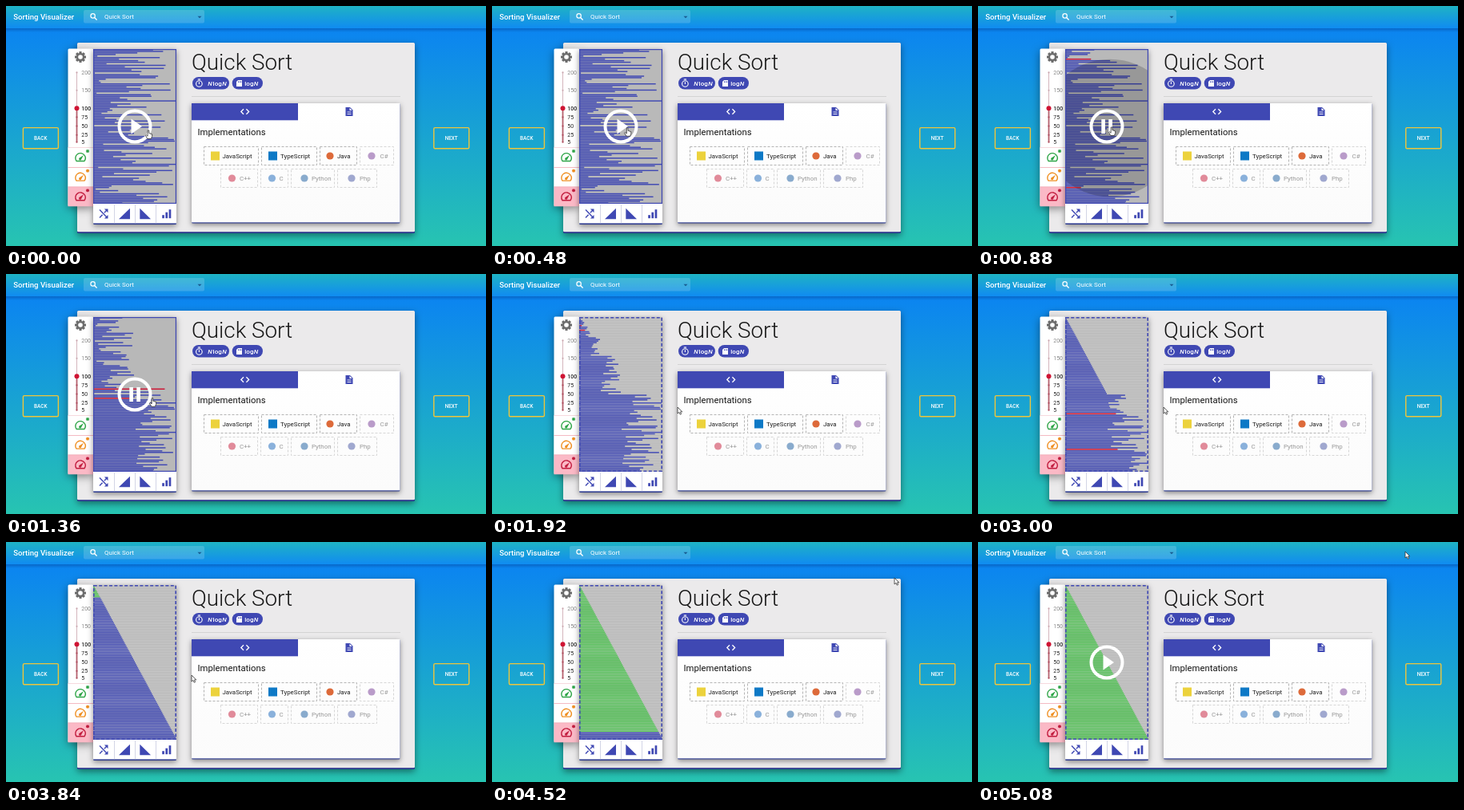
An HTML page with a canvas that plays this animation: 600x301 px, repeating every 5.12 s.

```html
<!DOCTYPE html>
<html lang="en">
<head>
<meta charset="utf-8">
<title>Sorting Visualizer</title>
<style>
html, body { margin: 0; width: 100%; height: 100%; overflow: hidden; background: #1494e2; }
canvas { display: block; width: 600px; height: 301px; }
</style>
</head>
<body>
<canvas id="stage"></canvas>
<script>
const W = 600, H = 301, LOOP = 5120, N = 100;
const INDIGO = '#3f48b3', NAVY = '#26348c', RED = '#cf1433', GREEN = '#4fc052';
const BOX = { x: 109, y: 54, w: 104, h: 194 };
const PLAY_AT = 720, SORT_AT = 780, LEAVE_AT = 1400, SORTED_AT = 3775, DONE_AT = 4560;

const canvas = document.getElementById('stage');
const g = canvas.getContext('2d');
const dpr = window.devicePixelRatio || 1;
canvas.width = W * dpr;
canvas.height = H * dpr;

// ---- drawing helpers ----
function rect(x, y, w, h, color) {
  g.fillStyle = color;
  g.fillRect(x, y, w, h);
}

function round(x, y, w, h, r, color) {
  g.fillStyle = color;
  g.beginPath();
  g.roundRect(x, y, w, h, r);
  g.fill();
}

function panel(x, y, w, h, color, blur = 8, dy = 3) {
  g.save();
  g.shadowColor = 'rgba(0,0,0,.45)';
  g.shadowBlur = blur * dpr;
  g.shadowOffsetY = dy * dpr;
  round(x, y, w, h, 1.5, color);
  g.restore();
}

function disc(x, y, r, color) {
  g.fillStyle = color;
  g.beginPath();
  g.arc(x, y, r, 0, Math.PI * 2);
  g.fill();
}

function ring(x, y, r, color, width) {
  g.strokeStyle = color;
  g.lineWidth = width;
  g.beginPath();
  g.arc(x, y, r, 0, Math.PI * 2);
  g.stroke();
}

function trace(points) {
  g.beginPath();
  for (let i = 0; i < points.length; i += 2) g.lineTo(points[i], points[i + 1]);
}

function poly(points, color) {
  trace(points);
  g.closePath();
  g.fillStyle = color;
  g.fill();
}

function line(points, color, width = 1) {
  trace(points);
  g.strokeStyle = color;
  g.lineWidth = width;
  g.stroke();
}

function text(s, x, y, size, color, weight = 400, align = 'left', style = '') {
  g.font = `${style} ${weight} ${size}px Roboto, sans-serif`;
  g.textAlign = align;
  g.fillStyle = color;
  g.fillText(s, x, y);
}

function dashed(x, y, w, h, color, width, dash) {
  g.save();
  g.setLineDash(dash);
  g.strokeStyle = color;
  g.lineWidth = width;
  g.strokeRect(x, y, w, h);
  g.restore();
}

function fade(y0, y1, top, bottom) {
  const f = g.createLinearGradient(0, y0, 0, y1);
  f.addColorStop(0, top);
  f.addColorStop(1, bottom);
  return f;
}

// ---- quick sort, recorded step by step ----
function shuffled() {
  let seed = 20;
  const random = () => (seed = (seed * 16807) % 2147483647) / 2147483647;
  const a = Array.from({ length: N }, (_, i) => i + 1);
  for (let i = 0; i < 20; i++) random();
  for (let i = N - 1; i > 0; i--) {
    const j = Math.floor(random() * (i + 1));
    [a[i], a[j]] = [a[j], a[i]];
  }
  return a;
}

function record(start) {
  const a = start.slice(), steps = [];
  (function sort(lo, hi) {
    if (lo >= hi) return;
    const pivot = (lo + hi) / 2 + 1;
    let i = lo, j = hi;
    while (i <= j) {
      steps.push({ values: a.slice(), i, j, lo, hi });
      const low = a[i] <= pivot, high = a[j] > pivot;
      if (low) i++;
      if (high) j--;
      if (!low && !high) [a[i], a[j]] = [a[j], a[i]];
    }
    sort(lo, j);
    sort(i, hi);
  })(0, N - 1);
  return steps;
}

const start = shuffled();
const sorted = start.slice().sort((a, b) => a - b);
const steps = record(start);
const pace = [
  [SORT_AT, 0],
  [880, steps.findIndex(s => s.i >= 6)],
  [1920, steps.findIndex(s => s.hi < 13 && s.i >= 5)],
  [3000, steps.findIndex(s => s.lo === 50 && s.hi === 99 && s.i >= 62)],
  [SORTED_AT, steps.length]
];

// Linear interpolation through rows of [time, ...values].
function follow(keys, t) {
  let k = 0;
  while (k < keys.length - 2 && t >= keys[k + 1][0]) k++;
  const a = keys[k], b = keys[k + 1];
  const f = Math.max(0, Math.min(1, (t - a[0]) / (b[0] - a[0])));
  return a.slice(1).map((v, n) => v + (b[n + 1] - v) * f);
}

// ---- page ----
function header() {
  rect(0, 0, W, H, fade(28, H, '#0b84f1', '#27c4b1'));
  rect(0, 28, W, 5, fade(28, 33, 'rgba(0,30,90,.28)', 'rgba(0,30,90,0)'));
  rect(0, 0, W, 28, fade(0, 28, '#1fb3c4', '#108bf1'));
  text('Sorting Visualizer', 9.2, 16.8, 9.6, '#fff', 500);
  round(97, 5, 151, 16.5, 2, 'rgba(255,255,255,.16)');
  ring(108.6, 12.4, 2.7, '#fff', 1.2);
  line([110.6, 14.4, 113.6, 17.4], '#fff', 1.4);
  text('Quick Sort', 123, 16.4, 8, '#fff');
  poly([239.5, 12.7, 244.5, 12.7, 242, 15.2], 'rgba(0,35,90,.6)');
}

function button(label, x) {
  g.strokeStyle = '#efc53b';
  g.lineWidth = 1.4;
  g.beginPath();
  g.roundRect(x + .6, 152.6, 44, 26.2, 1.5);
  g.stroke();
  text(label, x + 22.5, 168, 6.4, '#fff', 500, 'center');
}

function chips() {
  round(233, 89, 46, 15.5, 7.7, INDIGO);
  ring(241.4, 97.5, 3.8, '#fff', 1.1);
  line([239.8, 92, 243, 92], '#fff', 1.2);
  line([241.4, 95.2, 241.4, 98], '#fff', 1.1);
  text('N', 252.2, 99.8, 8, '#fff', 500, 'left', 'italic');
  text('log', 258.6, 99.8, 8, '#fff', 500);
  text('N', 270.3, 99.8, 8, '#fff', 500, 'left', 'italic');
  round(282.7, 89, 38.3, 15.5, 7.7, INDIGO);
  poly([290, 93, 295, 93, 295, 101, 288, 101, 288, 95], '#fff');
  for (const x of [290, 291.8, 293.5]) rect(x, 94.2, .8, 2, INDIGO);
  text('log', 298.3, 99.8, 8, '#fff', 500);
  text('N', 309.8, 99.8, 8, '#fff', 500, 'left', 'italic');
}

function language(label, left, right, top, iconX, textX, color, square, active) {
  g.save();
  dashed(left + .5, top + .5, right - left - 1, 23, active ? '#b4b4b4' : '#d6d6d6', 1, [3, 2]);
  g.globalAlpha = active ? 1 : .6;
  if (square) rect(iconX - 5.5, top + 6.5, 11, 11, color);
  else disc(iconX, top + 12, 4.6, color);
  text(label, textX, top + 14.7, 7.9, active ? '#1c1c1c' : '#555');
  g.restore();
}

function card() {
  panel(89, 46, 422, 239, NAVY, 9, 3);
  round(89, 46, 422, 237.3, 1.5, '#ebeaeb');
  text('Quick Sort', 232, 79.8, 27.8, '#161616', 300);
  chips();
  rect(232, 113, 261, 1, '#d3d3d3');

  panel(232, 122, 260.5, 150.6, NAVY, 6, 2);
  rect(232, 122, 260.5, 149.4, fade(122, 272, '#fff', '#fbfbfb'));
  rect(232, 122, 133, 21.3, INDIGO);
  line([297, 129.3, 293.8, 132.5, 297, 135.7], '#fff', 1.3);
  line([300.4, 129.3, 303.6, 132.5, 300.4, 135.7], '#fff', 1.3);
  poly([424.5, 127, 430, 127, 433.5, 130.5, 433.5, 138, 424.5, 138], INDIGO);
  line([426.5, 133, 431.5, 133], '#fff', .9);
  line([426.5, 135.5, 431.5, 135.5], '#fff', .9);
  poly([429.5, 127.8, 429.5, 131, 432.6, 131], '#fff');
  text('Implementations', 239.5, 161.8, 11.3, '#161616');

  language('JavaScript', 247, 316, 176, 261.5, 270.5, '#ecd23c', true, true);
  language('TypeScript', 319, 389, 176, 333.5, 343, '#0d79c6', true, true);
  language('Java', 392, 439, 176, 405, 414, '#dd6a3a', false, true);
  language('C#', 442, 485, 176, 457, 467.5, '#8c5aa6', false, false);
  language('C++', 268, 315, 204, 282.5, 292, '#cf3f58', false, false);
  language('C', 318, 353, 204, 332.5, 341.5, '#3d7fc4', false, false);
  language('Python', 356, 411, 204, 373, 382, '#3c74ad', false, false);
  language('Php', 414, 464, 204, 432, 442, '#6270b0', false, false);
}

function gear(x, y, r, color, hole) {
  for (let k = 0; k < 8; k++) {
    g.save();
    g.translate(x, y);
    g.rotate(k * Math.PI / 4);
    rect(-r * .22, -r, r * .44, r, color);
    g.restore();
  }
  disc(x, y, r * .76, color);
  disc(x, y, r * .4, hole);
}

function gauge(y, color, back) {
  rect(77.5, y - 12.5, 31.5, 24.5, back);
  g.lineJoin = 'round';
  g.strokeStyle = color;
  g.lineWidth = 1.4;
  g.beginPath();
  g.arc(93, y + .8, 6.2, Math.PI * .8, Math.PI * 2.2);
  g.closePath();
  g.stroke();
  poly([91.2, y + 1, 97, y - 3, 93.8, y + 3], color);
  disc(92.6, y + 2, 1.5, color);
  g.lineJoin = 'miter';
  gear(102, y - 8, 2.1, color, color);
}

function settings() {
  panel(77.5, 53.5, 31.5, 197.5, '#fff', 11, 3);
  gear(93, 64, 7, '#6c6c6c', '#fff');
  const place = v => 173 - v * .448;
  const top = place(200), mid = place(100);
  rect(88, top, 1, mid - top, '#d5b6bd');
  rect(87.6, mid, 1.8, place(5) - mid, '#b5616f');
  for (const v of [200, 150, 100, 75, 50, 25, 5]) {
    const y = place(v), grey = v > 100;
    disc(88.5, y, 1.1, grey ? '#c9a5ad' : '#b04f60');
    text(v, 94.3, y + 2.4, 6.9, grey ? '#8a8a8a' : '#222', v === 100 ? 500 : 400);
  }
  disc(88.5, mid, 3, RED);
  gauge(190, '#2fa548', '#fff');
  gauge(214.7, '#ef8f22', '#fff');
  gauge(239.3, '#c21d3f', '#fbb9c6');
  rect(77.5, 177, 31.5, .7, '#f3c9d0');
  rect(77.5, 202, 31.5, .8, '#f2a9b5');
  rect(77.5, 226.5, 31.5, .8, '#f2a9b5');
}

function toolbar() {
  panel(109, 54, 104, 220, NAVY, 7, 2);
  rect(109, 248, 104, 24.5, '#fff');
  for (let k = 1; k < 4; k++) rect(109 + k * 26, 249, .8, 23.3, '#c9cbe0');
  line([117, 265.5, 126, 256], INDIGO, 1.4);
  disc(121.7, 260.6, 1.8, '#fff');
  line([117, 255.5, 126, 265], INDIGO, 1.4);
  poly([127.5, 254.6, 127.5, 259.2, 122.9, 254.6], INDIGO);
  poly([127.5, 266.6, 127.5, 262, 122.9, 266.6], INDIGO);
  poly([155, 253.7, 155, 267.2, 141, 267.2], INDIGO);
  poly([167.3, 253.7, 167.3, 267.2, 181, 267.2], INDIGO);
  [4, 7.5, 11].forEach((h, k) => rect(195.2 + k * 4.2, 266.2 - h, 2.7, h, INDIGO));
}

// ---- animated parts ----
function bars(t) {
  const { x, y, w, h } = BOX, pitch = h / N;
  let values = t < SORT_AT ? start : sorted, step = null;
  if (t >= SORT_AT && t < SORTED_AT) {
    step = steps[Math.min(steps.length - 1, Math.floor(follow(pace, t)[0]))];
    values = step.values;
  }
  const checked = t < SORTED_AT ? 0 : Math.floor((t - SORTED_AT) / (DONE_AT - SORTED_AT) * N);
  const hover = t < LEAVE_AT;
  rect(x, y, w, h, hover ? '#b9b9b9' : '#d9d9d9');
  values.forEach((v, k) => {
    const top = y + k * pitch + .3;
    const hot = step && (k === step.i || k === step.j);
    if (!hover) rect(x, top, w, 1.25, '#b2b2b2');
    rect(x, top, v * w / N, 1.45, hot ? RED : k < checked ? GREEN : INDIGO);
  });
}

function ripple(t) {
  const { x, y, w, h } = BOX;
  const age = t - PLAY_AT;
  if (age < 0 || age > 650) return;
  g.save();
  g.beginPath();
  g.rect(x, y, w, h);
  g.clip();
  const grow = 1 - Math.pow(1 - Math.min(1, age / 450), 2);
  const alpha = .18 * Math.min(1, (650 - age) / 250);
  disc(165, 153, 147 * grow, `rgba(0,0,0,${alpha})`);
  g.restore();
}

function frame(t) {
  const { x, y, w, h } = BOX;
  if (t < LEAVE_AT) {
    g.strokeStyle = INDIGO;
    g.lineWidth = 1.2;
    g.strokeRect(x + .6, y + .6, w - 1.2, h - 1.2);
  } else {
    dashed(x + .8, y + .8, w - 1.6, h - 1.6, INDIGO, 1.6, [4, 2.4]);
  }
}

function control(t) {
  if (t >= LEAVE_AT && t < DONE_AT) return;
  ring(161, 151, 19.5, '#fff', 4);
  if (t >= PLAY_AT && t < DONE_AT) {
    rect(154.3, 142, 4.6, 18, '#fff');
    rect(163.3, 142, 4.6, 18, '#fff');
  } else {
    poly([156.5, 141.5, 170, 151, 156.5, 160.5], '#fff');
  }
}

const route = [
  [0, 178, 156], [600, 167, 152], [1250, 167, 152], [1700, 232, 167],
  [3950, 232, 167], [4520, 503, 45], [5080, 534, 12], [LOOP, 535, 11]
];
const arrow = [0, 0, 0, 8, 1.9, 6.4, 3.2, 9.2, 4.6, 8.6, 3.4, 5.9, 5.8, 5.9];
const hand = [-.8, 0, .8, 0, .9, 3.6, 4.6, 4.8, 4.6, 7.5, 3.4, 10.5, -1.2, 10.5, -3.6, 6.4, -2.6, 5.8, -.9, 7.2];

function pointer(t) {
  const [x, y] = follow(route, t);
  g.save();
  g.translate(x, y);
  g.lineJoin = 'round';
  const shape = t < LEAVE_AT ? hand : arrow;
  poly(shape, '#fff');
  line(shape.concat(shape.slice(0, 2)), '#333', .8);
  g.restore();
}

function draw(t) {
  g.setTransform(dpr, 0, 0, dpr, 0, 0);
  header();
  button('BACK', 20.8);
  button('NEXT', 534.2);
  card();
  settings();
  toolbar();
  bars(t);
  ripple(t);
  frame(t);
  control(t);
  pointer(t);
}

const began = performance.now();
function tick() {
  draw((performance.now() - began) % LOOP);
  requestAnimationFrame(tick);
}
tick();
</script>
</body>
</html>
```
